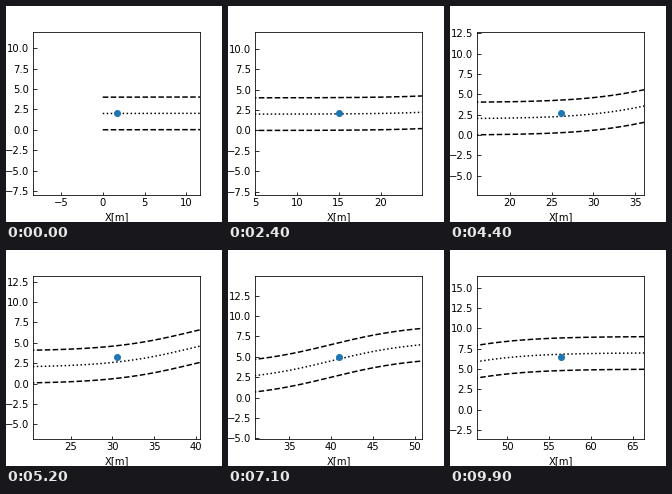
A matplotlib script for the animation above (10 s loop, 216 px wide and 216 px high).

```python
import numpy as np
import matplotlib.pyplot as plt
from matplotlib.animation import FuncAnimation

FRAMES, DT = 100, 0.1
SPEED = 20 / 3.6          # m/s
PREVIEW = 2.0 * SPEED     # look-ahead distance
VIEW = 10                 # half width of the moving window
WARMUP = 3                # steps driven before the first picture


def lane(x):
    """Centre line of a smooth lane change from y = 2 to y = 7."""
    return 2 + 5 / (1 + np.exp(-0.2 * (x - 40)))


def drive(steps):
    """Steer at a preview point on the lane and return every position."""
    x, y = 0.0, 2.0
    track = [(x, y)]
    for _ in range(steps):
        heading = np.arctan2(lane(x + PREVIEW) - y, PREVIEW)
        x += SPEED * DT * np.cos(heading)
        y += SPEED * DT * np.sin(heading)
        track.append((x, y))
    return track


track = drive(FRAMES + WARMUP)

plt.rcParams.update({
    "font.family": "DejaVu Sans",
    "font.size": 10,
    "xtick.direction": "in",
    "ytick.direction": "in",
})
fig, ax = plt.subplots(figsize=(3, 3), dpi=72)
fig.subplots_adjust(left=0.125, right=0.9, bottom=0.125, top=0.88)

road = np.arange(0, 100, 0.1)
for offset, style in ((-2, "--"), (0, ":"), (2, "--")):
    ax.plot(road, lane(road) + offset, "k" + style, lw=1.5)
car, = ax.plot([], [], "o", color="C0", ms=6, zorder=3)
ax.set_xlabel("X[m]")


def update(i):
    x, y = track[i + WARMUP]
    car.set_data([x], [y])
    ax.set_xlim(x - VIEW, x + VIEW)
    ax.set_ylim(y - VIEW, y + VIEW)
    return car,


anim = FuncAnimation(fig, update, frames=FRAMES, interval=1000 * DT,
                     repeat=True, repeat_delay=0, blit=False)
plt.show()
```
